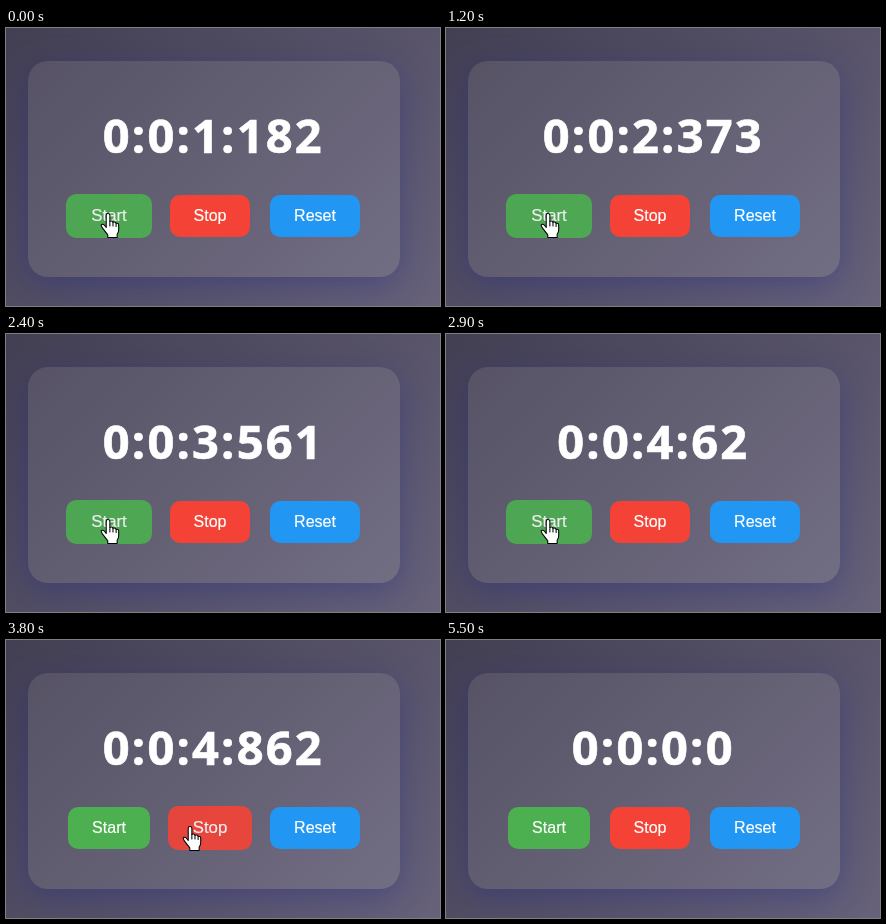
These frames come from a looping animation (434x278 px, 5.6 s). An HTML page:

```html
<!DOCTYPE html>
<html lang="en">
<head>
<meta charset="utf-8">
<title>Stopwatch</title>
<style>
  html, body { margin: 0; width: 100%; height: 100%; overflow: hidden; }
  body { position: relative; background: linear-gradient(135deg, #433f53, #67627a); }
  .card {
    position: absolute; left: 22px; top: 33px; width: 372px; height: 216px;
    border-radius: 20px;
    background: rgba(255, 255, 255, .09);
    box-shadow: 0 8px 32px rgba(31, 38, 135, .37);
  }
  svg { position: absolute; left: 0; top: 0; }
  text { fill: #fff; stroke: #fff; text-anchor: middle; }
  #time { font: bold 47px "Open Sans", "Noto Sans", sans-serif; letter-spacing: 2.2px; stroke-width: .7; }
  .button text { font: 16px "Liberation Sans", sans-serif; stroke-width: .2; }
</style>
</head>
<body>
<div class="card"></div>
<svg width="434" height="278">
  <text id="time" x="207.3" y="125.2"></text>
  <g id="buttons"></g>
  <g id="cursor" stroke="#000" stroke-linejoin="round" stroke-linecap="round">
    <path fill="#fff" d="M5.5 14V2.2Q5.5.5 7.2.5T9 2.2V8q2.6-.8 3 .9 2.6-.7 3 1 2.5-.3 2.5 1.9V16q0 2-1.5 4.5v3H7V21L2 14.5Q0 11.6 1 11q1.5-.8 3 1z"/>
    <path fill="none" d="M9 8v4.5M12 9v3.5M15 10v3"/>
  </g>
</svg>
<script>
const LOOP = 5600, STEP = 100;
const STOP_AT = 3700, RESET_AT = 4400, LEAVE_AT = 5200;
const FADE = 200;
const BUTTON_Y = 188;

const buttons = [
  { label: 'Start', x: 103, width: 82, color: '#4caf50', enter: -1000, leave: 3000 },
  { label: 'Stop', x: 204, width: 80, color: '#f44336', enter: 3000, leave: 3900 },
  { label: 'Reset', x: 309, width: 90, color: '#2196f3', enter: 3950, leave: LEAVE_AT },
];

// Keyframes: time followed by the values at that time.
const clock = [[0, 1182], [800, 1981], [1800, 2962], [2400, 3561], [3200, 4363], [STOP_AT, 4862]];
const pointer = [[0, 94.5, 185], [3000, 94.5, 185], [3200, 176.5, 186], [3900, 176.5, 186], [4150, 295, 184]];

const byId = id => document.getElementById(id);
const clamp = v => Math.min(1, Math.max(0, v));

byId('buttons').innerHTML = buttons.map(({ label, width, color }) => `
  <g class="button">
    <rect x="${-width / 2}" y="-21" width="${width}" height="42" rx="10" fill="${color}"/>
    <text y="5">${label}</text>
  </g>`).join('');
const groups = document.querySelectorAll('.button');

function sample(keys, t) {
  const next = keys.findIndex(key => key[0] > t);
  if (next < 0) return keys[keys.length - 1].slice(1);
  const a = keys[next - 1], b = keys[next];
  const p = (t - a[0]) / (b[0] - a[0]);
  return a.slice(1).map((v, i) => v + (b[i + 1] - v) * p);
}

function formatTime(ms) {
  const seconds = Math.floor(ms / 1000);
  return [Math.floor(seconds / 3600), Math.floor(seconds / 60) % 60, seconds % 60, ms % 1000].join(':');
}

function draw(now) {
  const t = Math.floor(now % LOOP / STEP) * STEP;
  const elapsed = t < RESET_AT ? Math.round(sample(clock, t)[0]) : 0;
  byId('time').textContent = formatTime(elapsed);

  buttons.forEach(({ x, enter, leave }, i) => {
    const hover = clamp((t - enter) / FADE) - clamp((t - leave) / FADE);
    groups[i].setAttribute('transform', `translate(${x} ${BUTTON_Y}) scale(${1 + .05 * hover})`);
    groups[i].setAttribute('opacity', 1 - .1 * hover);
  });

  byId('cursor').setAttribute('transform', `translate(${sample(pointer, t)}) scale(1.04)`);
  byId('cursor').style.display = t < LEAVE_AT ? '' : 'none';
}

const start = performance.now();
function tick() {
  draw(performance.now() - start);
  requestAnimationFrame(tick);
}
tick();
</script>
</body>
</html>
```
